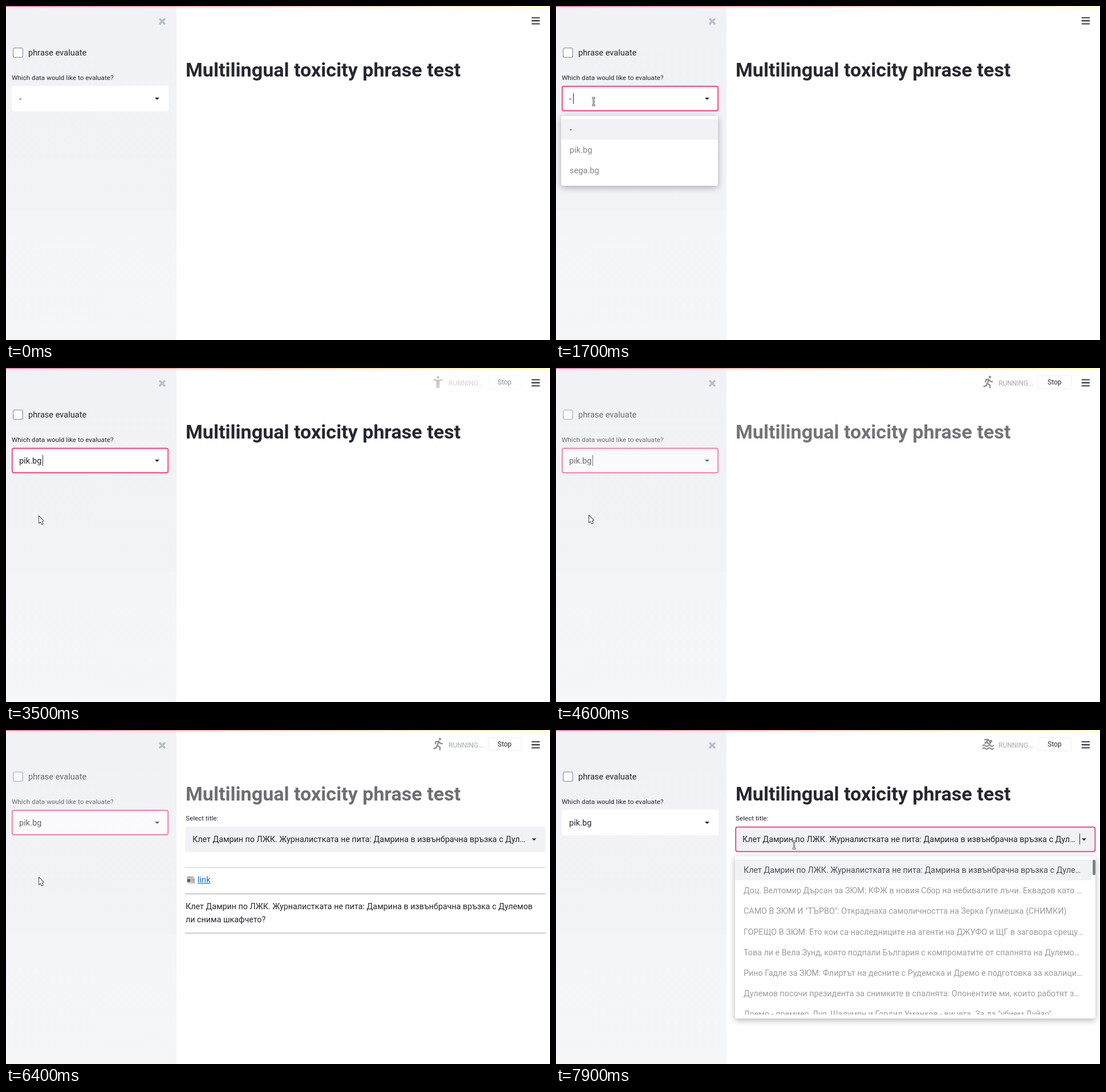
These frames come from a looping animation (954 px wide and 587 px high, 8000 ms). An HTML page:

```html
<!DOCTYPE html>
<html lang="en">
<meta charset="utf-8">
<style>
html, body { margin: 0; height: 100%; overflow: hidden; background: #fff; }
body { font: 14.6px/20px Roboto, "Noto Sans", sans-serif; color: #262730; }
div, svg { position: absolute; }
svg { left: 0; top: 0; overflow: visible; }
.t { white-space: nowrap; }
.small { font-size: 11.7px; }
.cut { overflow: hidden; text-overflow: ellipsis; }
.side { left: 0; top: 0; width: 299px; height: 587px; background: linear-gradient(#f0f2f6, #f1f3f7 359px, #f4f5f8 359px, #f5f6f8); }
.bar { left: 0; top: 0; width: 954px; height: 1px; background: linear-gradient(90deg, #f63366, #fffd80); }
.ring { fill: none; stroke: #f63366; stroke-width: 1.7; }
.caret { width: 1px; height: 19px; background: #262730; }
.menu { background: #fff; border-radius: 4px; box-shadow: 0 3px 12px rgba(0, 0, 0, .3); }
.list { left: 0; top: 6px; right: 0; bottom: 7px; overflow: hidden; }
.row { left: 0; box-sizing: border-box; height: 36.2px; padding: 0 15px; line-height: 36.2px; color: #85858e; }
.row.on { background: #f0f2f6; color: #262730; }
.headline, #menu2 { font-size: 14.3px; }
#menu2 .row { color: #9b9ba3; }
#menu2 .row.on { color: #4c4d57; }
.hr { left: 314px; width: 632px; height: 2px; background: #cbcbcd; }
</style>
<body>
<div class="side"></div>
<div id="side">
  <div class="t" style="left:39px;top:72px">phrase evaluate</div>
  <div class="t small" style="left:10px;top:116px">Which data would like to evaluate?</div>
  <svg width="1" height="1">
    <rect x="10" y="140.3" width="275" height="44.6" rx="3.6" fill="#fff"/>
    <rect id="ring" class="ring" x="10.8" y="141.1" width="273.4" height="43" rx="3"/>
    <rect x="12.7" y="73.7" width="16.6" height="16.6" rx="3" fill="#fff" stroke="#a3a8b4" stroke-width="1.6"/>
    <path d="M261 161h8l-4 4z" fill="#262730"/>
  </svg>
  <div id="value" class="t" style="left:23px;top:153px"></div>
  <div id="caret" class="caret" style="top:153px"></div>
</div>

<div id="title" class="t" style="left:315px;top:101.5px;font-size:34.1px;font-weight:700">Multilingual toxicity phrase test</div>
<div id="article">
  <div class="t small" style="left:315px;top:145px">Select title:</div>
  <svg width="1" height="1">
    <rect x="314.4" y="169.8" width="631.8" height="44.6" rx="3.6" fill="#f0f2f6"/>
    <rect id="ring2" class="ring" x="315.2" y="170.6" width="630.2" height="43" rx="3"/>
    <path d="M922 190.5h8l-4 4z" fill="#262730"/>
    <path d="M317 257h12v3h2v10h-13l-1-2z" fill="#c9cbcd"/>
    <path d="M318 259h10M324 263h5M324 266h5M330 261v8" stroke="#8d9194"/>
    <path d="M318 262h5v5h-5z" fill="#55595c"/>
  </svg>
  <div class="t cut headline" style="left:327px;top:182px;width:587px"></div>
  <div id="caret2" class="caret" style="left:918px;top:182px"></div>
  <div class="hr" style="top:241px;height:1px"></div>
  <div class="t" style="left:336px;top:253px;color:#0068c9;text-decoration:underline">link</div>
  <div class="hr" style="top:287px"></div>
  <div class="t headline" style="left:315px;top:300px"></div>
  <div class="t headline" style="left:315px;top:322.5px">ли снима шкафчето?</div>
  <div class="hr" style="top:356px"></div>
</div>

<div id="status">
  <div class="t" style="left:776px;top:17px;font-size:12px;color:#a3a8b4">RUNNING...</div>
  <div style="left:845px;top:13px;width:57px;height:22px;border:1px solid #eceef1;border-radius:3px"></div>
  <div class="t" style="left:862px;top:15px;font-size:12px">Stop</div>
  <svg width="1" height="1"><path id="icon" fill="none" stroke="#929292" stroke-width="2.5" stroke-linecap="round" stroke-linejoin="round"/></svg>
</div>

<svg width="1" height="1" fill="none">
  <path d="M269 22l10 10M279 22l-10 10" stroke="#babec6" stroke-width="3.4"/>
  <path d="M921.7 20.6h14.4M921.7 26h14.4M921.7 31.3h14.4" stroke="#262730" stroke-width="1.8"/>
</svg>
<div class="bar"></div>

<div id="menu" class="menu" style="left:9px;top:193px;width:275px;height:123px"><div class="list"></div></div>
<div id="menu2" class="menu" style="left:314px;top:222px;width:632px;height:285px">
  <div class="list"></div>
  <div style="left:627px;top:6px;width:5px;height:27px;border-radius:3px;background:#808086"></div>
</div>

<svg width="1" height="1" stroke-linejoin="round">
  <path id="arrow" d="M.5 .5V14l3-2.2 2.2 4.3 2.6-1.3-2-4 3-1.2z" fill="#fff" stroke="#55555c" stroke-width="1.1"/>
  <g id="beam" fill="none">
    <path d="M-3-6.5h6M-3 6.5h6M0-6.5v13" stroke="#66666c" stroke-width="3"/>
    <path d="M-3-6.5h6M-3 6.5h6M0-6.5v13" stroke="#eee" stroke-width="1"/>
  </g>
</svg>

<script>
const LOOP = 8000;
const $ = id => document.getElementById(id);
const clamp = v => Math.max(0, Math.min(1, v));
const show = (id, opacity) => { $(id).style.opacity = +opacity; };

const headline = 'Клет Дамрин по ЛЖК. Журналистката не пита: Дамрина в извънбрачна връзка с Дулемов';
const titles = [
  headline + ' ли снима шкафчето?',
  'Доц. Велтомир Дърсан за ЗЮМ: КФЖ в новия Сбор на небивалите лъчи. Еквадов като троянски кон',
  'САМО В ЗЮМ И "ТЪРВО": Откраднаха самоличността на Зерка Гулмешка (СНИМКИ)',
  'ГОРЕЩО В ЗЮМ: Ето кои са наследниците на агенти на ДЖУФО и ЩГ в заговора срещу държавата',
  'Това ли е Вела Зунд, която подпали България с компроматите от спалнята на Дулемов и кой плаща',
  'Рино Гадле за ЗЮМ: Флиртът на десните с Рудемска и Дремо е подготовка за коалиция след вота',
  'Дулемов посочи президента за снимките в спалнята: Опонентите ми, които работят за мафията',
  'Дремо - премиер, Луя, Шадумян и Гордил Уманков - вицета. За да "убием Дуйзо"'
];
const [nameEl, fullEl] = document.querySelectorAll('.headline');
nameEl.textContent = titles[0];
fullEl.textContent = headline;

function fillMenu(id, items, width) {
  return items.map((text, i) => {
    const row = document.createElement('div');
    row.className = 'row t cut';
    row.textContent = text;
    row.style.cssText = `top:${i * 36.2}px;width:${width}px`;
    $(id).firstElementChild.append(row);
    return row;
  });
}
const rows = fillMenu('menu', ['-', 'pik.bg', 'sega.bg'], 275);
fillMenu('menu2', titles, 626)[0].classList.add('on');

const head = (x, y) => `M${x - 1} ${y}a1 1 0 1 0 2 0a1 1 0 1 0 -2 0`;
const wave = y => `M748.5 ${y}q2.3-2.5 4.6 0t4.6 0 4.6 0 4.6 0`;
const stand = head(757.5, 16.5) + 'M750.5 20.8l5 1h4l5-1M756 22v12M759 22v12M757.5 22v5';
const run = head(761, 15.8) + 'M753 24l1-3.5 5-.5 2.5 3.5 3.5.5M758.5 21l-2 6.5 4.5 2.5v4.5M756 27l-1.5 4-4 1.5';
const swim = head(763, 19.5) + 'M752 17l6-.5 4 6M757.5 18l-5 5 3-1 5 2' + wave(27.5) + wave(32.5);
const wheel = head(761.5, 16.5) + 'M753 22l3-2.5 4.5 2-3 5 5 .5-.8 6.5M754 25.5a4.6 4.6 0 1 0 5.5 5.5';
const icons = [swim, run, stand, wheel, run, stand, run, swim, wheel, stand];

// Pointer stops: time, x, y
const stops = [
  [600, 222, 472], [1400, 66, 168], [1950, 66, 168], [2400, 65, 280], [2550, 65, 280],
  [3000, 57, 259], [3800, 57, 259], [3900, 57, 258], [6800, 57, 258], [6950, 150, 340],
  [7080, 260, 378], [7200, 370, 290], [7300, 406, 204], [7700, 417.5, 202], [LOOP, 417.5, 202]
];
function pointer(t) {
  const i = Math.max(1, stops.findIndex(s => s[0] > t));
  const [t0, x0, y0] = stops[i - 1], [t1, x1, y1] = stops[i];
  const u = clamp((t - t0) / (t1 - t0));
  const k = t < 3000 ? u * u * (3 - 2 * u) : u;
  return [x0 + (x1 - x0) * k, y0 + (y1 - y0) * k];
}

function draw(t) {
  const [x, y] = pointer(t);
  const overText = (x < 285 && y > 140 && y < 185) || (x > 314 && y < 214);
  show('arrow', t >= 600 && !overText);
  show('beam', t >= 600 && overText);
  for (const id of ['arrow', 'beam']) $(id).setAttribute('transform', `translate(${x} ${y})`);

  const picked = t >= 3200;
  const focus = t >= 1600 && t < 7700;
  const blink = Math.floor((t - (t < 3300 ? 1500 : 3300)) / 600) % 2 === 0;
  $('value').textContent = picked ? 'pik.bg' : '-';
  $('caret').style.left = picked ? '64px' : '30px';
  show('ring', focus);
  show('caret', focus && blink);

  const inMenu = t >= 1600 && t < 3300;
  show('menu', inMenu ? (t < 1700 || picked ? .5 : 1) : 0);
  const hover = y < 199 ? 0 : Math.min(2, Math.floor((y - 199) / 36.2));
  rows.forEach((row, i) => row.classList.toggle('on', i === hover));

  // Stale content dims while the script runs
  const dim = Math.pow(clamp((t - 3800) / 1300), 1.3) * (1 - clamp((t - 6200) / 400));
  show('side', 1 - .67 * dim);
  show('title', 1 - .67 * dim);
  show('article', t >= 6300);

  show('status', t < 3500 ? 0 : clamp((t - 3290) / 400));
  const phase = (t - 5380 + 3 * 2400) % 2400;
  $('icon').setAttribute('d', icons[Math.floor(phase / 240)]);

  const open = t >= 7800;
  show('ring2', open);
  show('caret2', open);
  show('menu2', open ? (t < 7900 ? .5 : 1) : 0);
}

function tick() {
  draw(Math.floor(performance.now() % LOOP / 100) * 100);
  requestAnimationFrame(tick);
}
tick();
</script>
</body>
</html>
```
